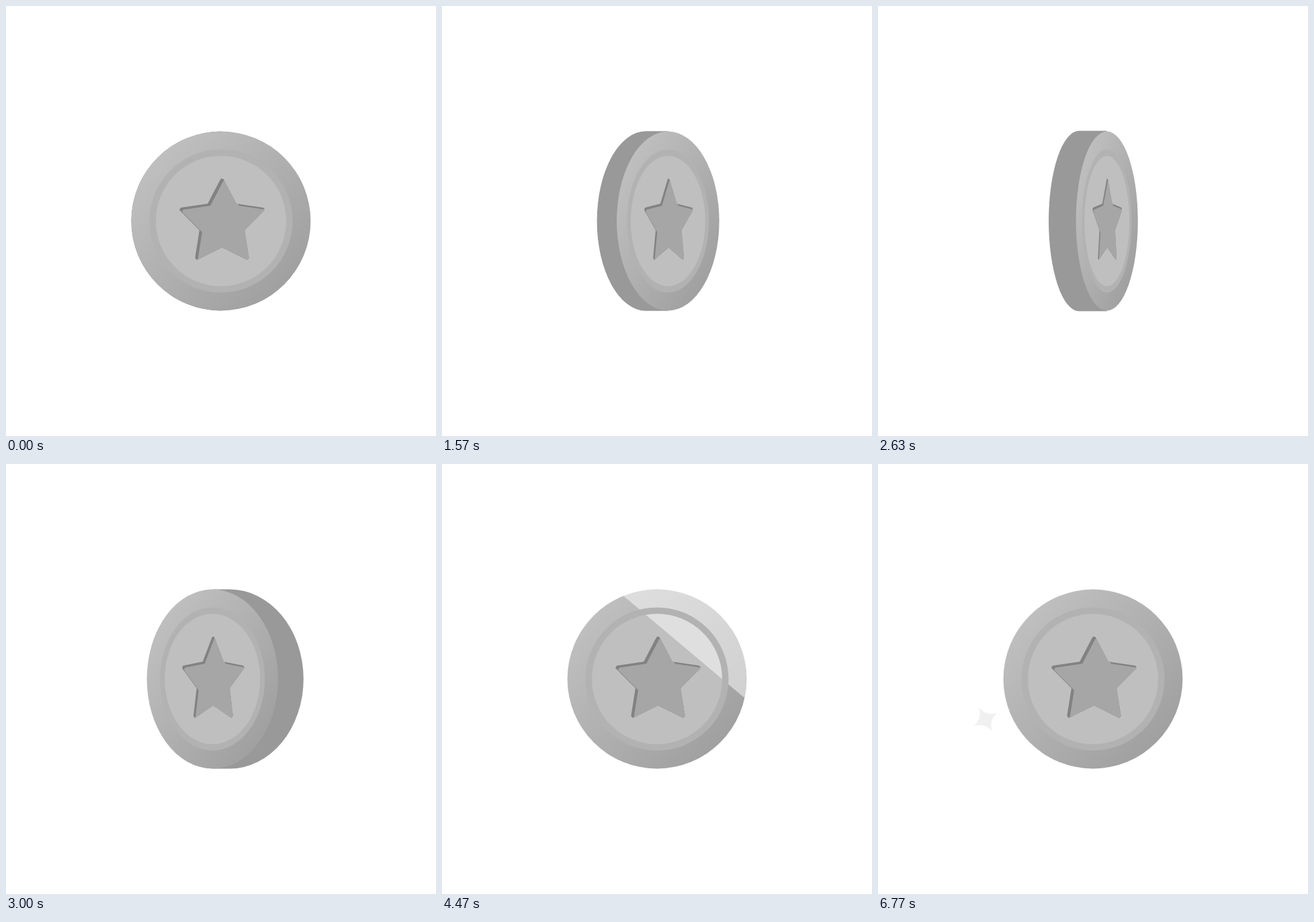
An HTML page for the animation above (7210 ms loop, 640x640 px).

```html
<!DOCTYPE html>
<html lang="en">
<head>
<meta charset="utf-8">
<title>Spinning coin</title>
<style>
  html, body { margin: 0; width: 100%; height: 100%; overflow: hidden; background: #fff; }
  svg { display: block; width: 100vw; height: 100vh; }
</style>
</head>
<body>
<svg viewBox="0 0 640 640">
  <defs>
    <linearGradient id="metal" x1="0" y1="0" x2="1" y2="1">
      <stop offset="0" stop-color="#c5c5c5"/>
      <stop offset="1" stop-color="#9a9a9a"/>
    </linearGradient>
    <path id="star" stroke-width="6" stroke-linejoin="round"
      d="M1.5-60 20.8-23 61.5-17 31.9 12.7 38.5 54.5 1.5 36-35.5 54.5-28.9 12.7-58.5-17-17.8-23Z"/>
    <mask id="starMask" maskUnits="userSpaceOnUse" x="-80" y="-80" width="160" height="160">
      <use href="#star" fill="#fff" stroke="#fff"/>
    </mask>
    <clipPath id="shiny"><path id="shinyArea" clip-rule="evenodd"/></clipPath>
    <path id="spark" d="M0-20Q3.5-3.5 20 0Q3.5 3.5 0 20Q-3.5 3.5-20 0Q-3.5-3.5 0-20Z" fill="#a6a6a6"/>
  </defs>
  <g transform="translate(320 320)">
    <path id="edge" fill="#999"/>
    <g id="face">
      <circle r="133.4" fill="url(#metal)"/>
      <circle r="106.5" fill="#b2b2b2"/>
      <circle r="97" fill="#bfbfbf"/>
      <use href="#star" fill="#828282" stroke="#828282"/>
      <g mask="url(#starMask)">
        <use href="#star" x="4" y="3" fill="#a6a6a6" stroke="#a6a6a6"/>
      </g>
    </g>
    <g clip-path="url(#shiny)">
      <rect id="shine" y="-200" width="100" height="400" fill="#fff" fill-opacity=".5"/>
    </g>
  </g>
  <use id="sparkA" href="#spark"/>
  <use id="sparkB" href="#spark"/>
</svg>
<script>
const LOOP = 7210, RADIUS = 133.4, HALF_DEPTH = 26.7;
const SPIN = { start: 0, firstEdge: 781, quarter: 490, lastEdge: 2741, end: 3530 };
const $ = id => document.getElementById(id);
const clamp = v => Math.max(0, Math.min(1, v));

const ring = r => `M${-r} 0A${r} ${r} 0 1 1 ${r} 0A${r} ${r} 0 1 1 ${-r} 0Z`;
$('shinyArea').setAttribute('d', [RADIUS, 106.5, 97].map(ring).join(''));

// Rotation in quarter turns: eased start, steady middle, eased stop.
function quarterTurns(t) {
  const { firstEdge, quarter, lastEdge, end } = SPIN;
  if (t < firstEdge) return (t / firstEdge) ** 1.8;
  if (t < lastEdge) return 1 + (t - firstEdge) / quarter;
  return 6 - clamp((end - t) / (end - lastEdge)) ** 1.85;
}

function drawCoin(t) {
  const turns = quarterTurns(t);
  const index = Math.min(5, Math.floor(turns));
  const opening = index % 2 === 1;
  const tilt = opening ? index + 1 - turns : turns - index;
  const side = opening ? -1 : 1;
  const shift = side * HALF_DEPTH * tilt;
  const squash = Math.max(.001, Math.cos(tilt * Math.PI / 2));
  $('face').setAttribute('transform', `translate(${shift} 0) scale(${squash} 1)`);

  const power = index === 0 || index === 5 ? 3.1 : 1.8;
  const reach = 133.6 - (133.6 - HALF_DEPTH) * tilt ** power;
  const rx = Math.max(.01, reach - HALF_DEPTH * tilt);
  const h = 133.4 + 2.5 * tilt ** 4;
  $('edge').setAttribute('d',
    `M${shift} ${-h}H${-shift}A${rx} ${h} 0 0 ${opening ? 1 : 0} ${-shift} ${h}H${shift}Z`);
  $('edge').setAttribute('visibility', t < SPIN.end ? 'visible' : 'hidden');
}

function drawShine(t) {
  const front = -36 + .45 * (t - 4030);
  $('shine').setAttribute('transform', `rotate(-49.9) translate(${front - 100} 0)`);
  $('shine').setAttribute('visibility', t > 3800 && t < 4700 ? 'visible' : 'hidden');
}

function drawSpark(id, t, start, x, y, angle) {
  const age = t - start;
  const scale = clamp(age / 560);
  const fade = clamp(1 - .83 * (age - 600) / 360);
  $(id).setAttribute('transform', `translate(${x} ${y}) rotate(${angle}) scale(${scale})`);
  $(id).setAttribute('opacity', age > 0 ? fade : 0);
}

function draw(t) {
  drawCoin(t);
  drawShine(t);
  drawSpark('sparkA', t, 4850, 470.7, 209, 26);
  drawSpark('sparkB', Math.min(t, 6770), 5810, 160, 380.3, -29);
}

const begin = performance.now();
function tick() {
  draw((performance.now() - begin) % LOOP);
  requestAnimationFrame(tick);
}
draw(0);
requestAnimationFrame(tick);
</script>
</body>
</html>
```
